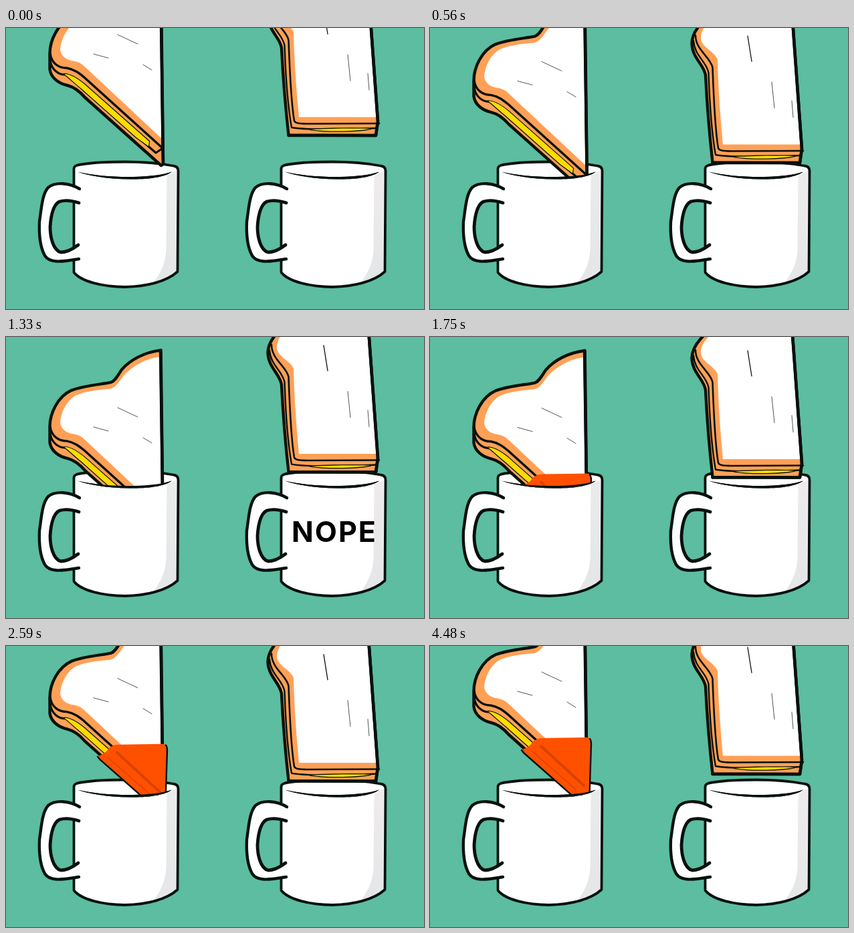
Recreate the animation shown at these times as an HTML page with a canvas. Size 625 by 421 pixels, loop 4550 ms.

```html
<!DOCTYPE html>
<html lang="en">
<head>
<meta charset="utf-8">
<title>Sandwich and mug</title>
<style>
html, body { margin: 0; width: 100%; height: 100%; overflow: hidden; background: #5cbda0; }
canvas { display: block; width: 100%; height: 100%; }
</style>
</head>
<body>
<canvas id="stage" width="625" height="421"></canvas>
<script>
const ctx = document.getElementById('stage').getContext('2d');
const LOOP = 4550, STEP = 70, MUG_GAP = 310, DUNK = 1540;
const INK = '#07110d', TEAL = '#5cbda0', CRUST = '#ffa057', YELLOW = '#ffdc00', SOUP = '#ff5000', SOUP_DARK = '#d84300';

const mug = {
  body: new Path2D('M101.5 212C101 206 107 205 115 204C135 201 155 200.5 178 200.5C208 200.5 232 203 250 206.5C255 207 257.5 210 257.5 214L256.5 365C240 380 210 387.5 178 388C145 387.5 112 380 101.5 366Z'),
  shade: new Path2D('M240.5 220C245 219 250 217 254.5 214V365C246 373 234 379 221 381C232 366 239 350 239.5 332Z'),
  handle: new Path2D('M112 241C95 232 74 230 63 239C54 249 53 270 50 290C49 312 52 330 58 341C65 352 80 351 112 346V325C100 331 92 336 82 336C70 333 66 312 66 298C67 282 70 265 80 260C90 257 100 260 112 263Z'),
  outer: new Path2D('M110 241C95 232 74 230 63 239C54 249 53 270 50 290C49 312 52 330 58 341C65 352 80 351 109 346'),
  inner: new Path2D('M109 262C100 259 90 257 80 260C70 265 67 282 66 298C66 312 70 333 82 336C92 336 100 331 108 325'),
  rim: new Path2D('M107 215.5C130 221 160 223.5 190 223C215 222.5 235 220 248 215.5C238 223 215 227 185 226.5C150 226 125 221.5 107 215.5Z'),
  mouth: new Path2D('M40 -200H300V216H247C235 223 215 226 185 226C150 226 125 221 107 216H40Z')
};

const half = {
  outer: new Path2D('M231 -76C207 -73 186 -62 173 -47C167 -38 163 -30 157 -28C143 -25 116 -23 98 -16C78 -7 65 18 65.5 40V62C67 74 78 83 92 86C104 89 112 97 118 104L232 206L235 204Z'),
  white: new Path2D('M231 -66C212 -65 190 -53 176 -38C168 -27 163 -19 155 -18C138 -17 116 -14 104 -8C90 0 82 18 81 33C84 47 97 49 104 50C112 52 117 57 121 61L232 165Z'),
  front: new Path2D('M66 38C68 54 80 60 91 60C103 62 111 69 117 74L233 179'),
  back: new Path2D('M66 48C68 64 80 70 88 70C98 71 108 84 115 92L224 187L233 181'),
  filling: new Path2D('M87 69C97 69 107 76 117 84L214 170L213 177L195 164L113 91C103 83 95 75 87 69Z'),
  side: new Path2D('M231.5 -76L235 204'),
  marks: new Path2D('M167 10L197 24M131 39L153 45M205 55L218 63')
};

const soup = {
  shape: new Path2D('M168 109C160 109 156 112 151 118C147 123 142 124 137 127L140 131L234 214L238 210L241 118C241 111 239 108 234 108Z'),
  edge: new Path2D('M137 127L140 131L234 214M239 110Q241 112 241 118L238 210'),
  wide: new Path2D('M166 121L230 180'),
  thin: new Path2D('M152 128L218 186')
};

const slab = {
  outer: new Path2D('M541 -67C505 -76 455 -74 432 -66C412 -58 392 -38 391.5 -18C392 4 410 14 412 30C414 70 418 120 422.5 160.5L553 161L556 140Z'),
  white: new Path2D('M538 -62C505 -70 455 -68 436 -62C418 -55 404 -40 405 -24C407 -12 426 -5 430 6C431 50 434 90 438 133.5H554L548 20Z'),
  front: new Path2D('M397 -30C397 -8 419 2 422.5 18C424 60 426 110 431 139C433 143.5 440 143 450 143.5L558 143'),
  back: new Path2D('M394 -22C396 2 413 8 416.5 26C418 70 421 115 427 149C440 152 500 153 555 150'),
  filling: new Path2D('M455 152C480 156 525 155 545 151C520 150 480 151 455 152Z'),
  side: new Path2D('M541 -67L556 140L553 161H422.5'),
  marks: new Path2D('M511 40L515 79M541 68L543 93'),
  bold: new Path2D('M475 -29L481 9')
};

// [time, value] pairs
const halfMoves = [[0, 0], [DUNK, 111], [2730, 29]];
const slabMoves = [[0, 0], [350, 68], [630, 32], [980, 68], [1470, 31], [2030, 68], [2240, 68], [2730, 31]];
const signMoves = [[1190, 0], [1330, 1], [1610, 1], [1750, 0], [3150, 0], [3290, 1], [4340, 1], [4480, 0]];

function track(keys, t) {
  if (t <= keys[0][0]) return keys[0][1];
  for (let i = 1; i < keys.length; i++) {
    const [t0, v0] = keys[i - 1], [t1, v1] = keys[i];
    if (t <= t1) return v0 + (v1 - v0) * (t - t0) / (t1 - t0);
  }
  return keys[keys.length - 1][1];
}

function fill(path, color) {
  ctx.fillStyle = color;
  ctx.fill(path);
}

function line(path, width, color = INK) {
  ctx.lineWidth = width;
  ctx.strokeStyle = color;
  ctx.stroke(path);
}

function drawMug(shadeTop) {
  fill(mug.body, '#fff');
  const grad = ctx.createLinearGradient(0, 215, 0, 380);
  grad.addColorStop(0, shadeTop);
  grad.addColorStop(1, '#e4e6e7');
  fill(mug.shade, grad);
  line(mug.body, 3.8);
  fill(mug.handle, '#fff');
  line(mug.outer, 4.4);
  line(mug.inner, 4.8);
  fill(mug.rim, INK);
}

function drawBread(bread, frontWidth, backWidth) {
  fill(bread.outer, CRUST);
  fill(bread.white, '#fff');
  line(bread.back, backWidth);
  line(bread.filling, 2.4);
  fill(bread.filling, YELLOW);
  line(bread.front, frontWidth);
  line(bread.outer, 4.4);
  line(bread.side, 4.6);
  line(bread.marks, 0.7);
}

function drawSoup() {
  fill(soup.shape, SOUP);
  line(soup.wide, 4, SOUP_DARK);
  line(soup.thin, 1.3, SOUP_DARK);
  line(soup.edge, 2.4);
}

function dip(mugX, drop, paint) {
  ctx.save();
  ctx.translate(mugX, 0);
  ctx.clip(mug.mouth);
  ctx.translate(-mugX, drop);
  paint();
  ctx.restore();
  ctx.save();
  ctx.translate(mugX, 0);
  fill(mug.rim, INK);
  ctx.restore();
}

function drawSign(alpha) {
  if (!alpha) return;
  ctx.save();
  ctx.globalAlpha = alpha;
  ctx.fillStyle = '#000';
  ctx.font = '700 43px Inter, "Open Sans", sans-serif';
  ctx.letterSpacing = '2px';
  ctx.textAlign = 'center';
  ctx.fillText('NOPE', 491, 307);
  ctx.restore();
}

function draw(t) {
  ctx.fillStyle = TEAL;
  ctx.fillRect(0, 0, 625, 421);
  ctx.lineCap = ctx.lineJoin = 'round';

  drawMug('#e9ebeb');
  ctx.save();
  ctx.translate(MUG_GAP, 0);
  drawMug('#efebed');
  ctx.restore();

  dip(0, track(halfMoves, t), () => {
    drawBread(half, 3.4, 3.2);
    if (t >= DUNK) drawSoup();
  });
  dip(MUG_GAP, track(slabMoves, t), () => {
    drawBread(slab, 2.6, 2.4);
    line(slab.bold, 1.3);
  });
  drawSign(track(signMoves, t));
}

const start = performance.now();
function tick() {
  const t = (performance.now() - start) % LOOP;
  draw(Math.floor(t / STEP) * STEP);
  requestAnimationFrame(tick);
}
tick();
</script>
</body>
</html>
```
